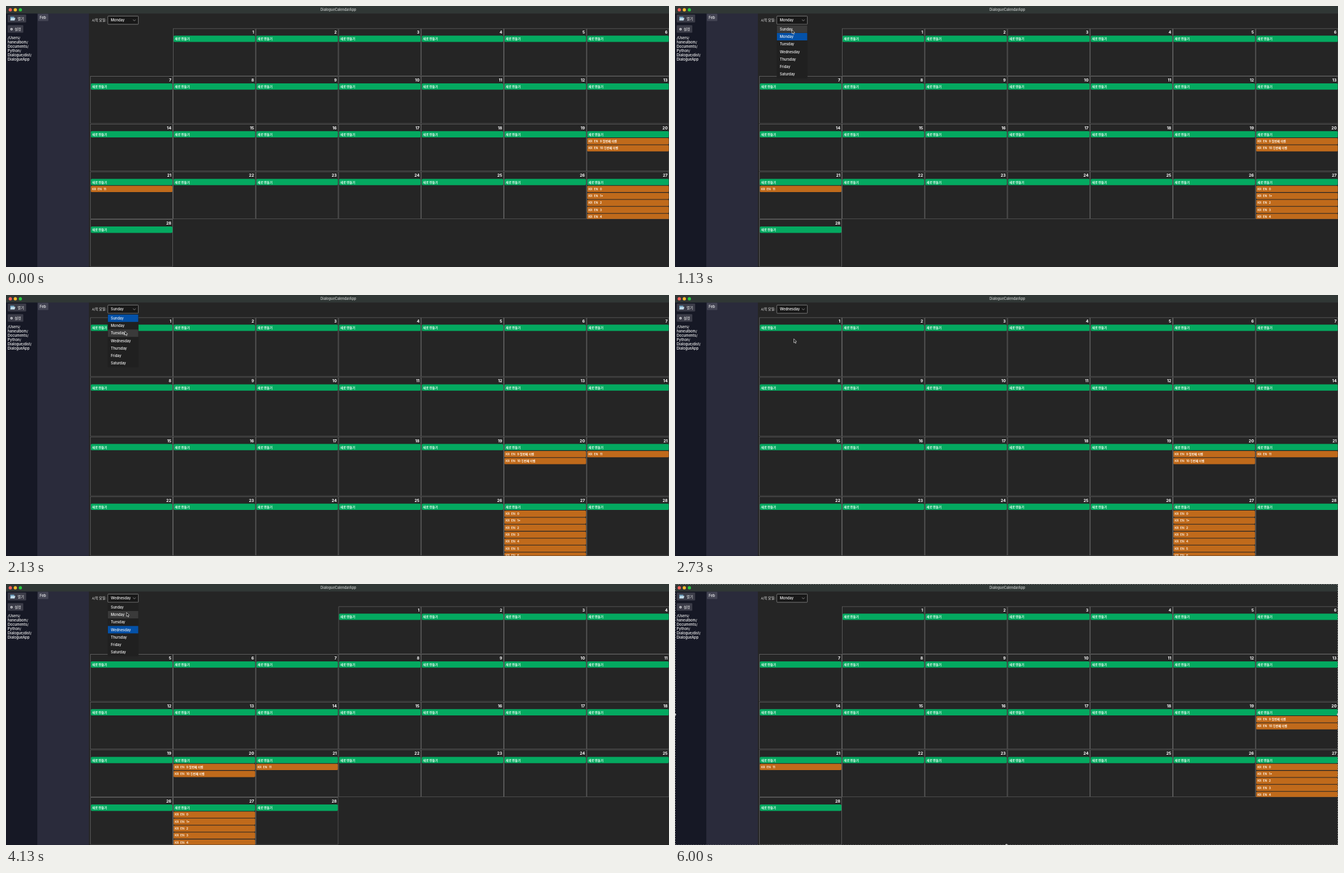
These frames come from a looping animation (1080x425 px, 6.54 s). An HTML page with a canvas:

```html
<!DOCTYPE html>
<html lang="ko">
<head>
<meta charset="utf-8">
<title>DialogueCalendarApp</title>
<style>
html, body { margin: 0; width: 100%; height: 100%; overflow: hidden; background: #252525; }
canvas { display: block; width: 1080px; height: 425px; }
</style>
</head>
<body>
<canvas id="stage"></canvas>
<script>
const W = 1080, H = 425, LOOP = 6540;
const canvas = document.getElementById('stage');
const ctx = canvas.getContext('2d');
const dpr = window.devicePixelRatio || 1;
canvas.width = W * dpr;
canvas.height = H * dpr;

const FONT = 'Inter, "Noto Sans CJK KR", "Noto Sans CJK", sans-serif';
const DAYS = ['Sunday', 'Monday', 'Tuesday', 'Wednesday', 'Thursday', 'Friday', 'Saturday'];
const PATH = ['/Users/', 'haneulbom/', 'Documents/', 'Python/', 'Dialogue/dist/', 'DialogueApp'];
const EVENTS = {
  20: ['9 첫번째 이벤', '10 두번째 이벤'],
  21: ['11'],
  27: ['0', '1*', '2', '3', '4', '5', '6']
};
const LEFT = 137.6, TOP = 36.8, BOTTOM = 425.3, COL = 134.75, CELL = 134;
const COMBO = { x: 165.8, y: 16.4, w: 49.8, h: 13.4 };
const ITEM_TOP = 31.8, ITEM_H = 12.2;

// Each visit opens the list, then picks the row under (x, y).
const VISITS = [
  { open: 930, pick: 1390, x: 190.6, y: 38.8 },
  { open: 2000, pick: 2710, x: 193.6, y: 71.3 },
  { open: 3530, pick: 4200, x: 196.3, y: 46.3 }
];
const START_DAY = 1, GRID_LAG = 75, LEAVE = 5470, STOP = 6000;
const OUTSIDE = { x: 540, y: 432 };

const rowAt = y => Math.floor((y - ITEM_TOP) / ITEM_H);

function dayAt(t) {
  return VISITS.reduce((day, v) => t >= v.pick ? rowAt(v.y) : day, START_DAY);
}

function pointerAt(t) {
  let { x, y } = OUTSIDE;
  const glide = (to, at, span) => {
    const k = Math.min(1, Math.max(0, (t - at) / span));
    const e = k * k * (3 - 2 * k);
    x += (to.x - x) * e;
    y += (to.y - y) * e;
  };
  for (const v of VISITS) {
    glide({ x: v.x, y: 26.3 }, v.open - 500, 300);
    glide(v, v.open, 200);
  }
  glide(OUTSIDE, LEAVE, 460);
  return { x, y };
}

function rect(x, y, w, h, fill) {
  ctx.fillStyle = fill;
  ctx.fillRect(x, y, w, h);
}

function round(x, y, w, h, r, fill, stroke) {
  ctx.beginPath();
  ctx.roundRect(x, y, w, h, r);
  ctx.fillStyle = fill;
  ctx.fill();
  if (stroke) {
    ctx.strokeStyle = stroke;
    ctx.lineWidth = 0.8;
    ctx.stroke();
  }
}

function dot(x, y, r, fill) {
  ctx.beginPath();
  ctx.arc(x, y, r, 0, Math.PI * 2);
  ctx.fillStyle = fill;
  ctx.fill();
}

function poly(points, fill, stroke) {
  ctx.beginPath();
  points.forEach(([x, y]) => ctx.lineTo(x, y));
  if (fill) {
    ctx.closePath();
    ctx.fillStyle = fill;
    ctx.fill();
  }
  if (stroke) {
    ctx.strokeStyle = stroke;
    ctx.lineWidth = 0.7;
    ctx.stroke();
  }
}

// y is the middle of the capitals
function text(str, x, y, size = 5.8, weight = 500, fill = '#f4f4f4', align = 'left') {
  ctx.font = `${weight} ${size}px ${FONT}`;
  ctx.textAlign = align;
  ctx.fillStyle = fill;
  ctx.fillText(str, x, y + size * 0.364);
}

function drawWindow() {
  rect(0, 0, W, H, '#252525');
  rect(0, 12, 51, H, '#161825');
  rect(51, 12, 84, H, '#2a2b3b');
  rect(0, 0, W, 12.3, '#303735');
  ['#fe5f57', '#febc2e', '#28c840'].forEach((c, i) => dot(7 + i * 8.2, 6.2, 2.6, c));
  text('DialogueCalendarApp', 541.3, 6.2, 5.5, 600, '#b9bebc', 'center');

  round(2.8, 14, 30, 12.8, 1.2, '#3b3c48');
  rect(7, 17.4, 6.5, 5.8, '#6d9fbd');
  poly([[8.3, 19.6], [15.3, 19.6], [14, 23.4], [7, 23.4]], '#c3dce9');
  text('열기', 18.8, 20.4);
  round(2.8, 31.3, 25.4, 12.2, 1.2, '#3b3c48');
  dot(9, 37.7, 2, '#d8d8dc');
  dot(9, 37.7, 0.8, '#4a4b57');
  text('설정', 14, 37.4);
  PATH.forEach((line, i) => text(line, 2.8, 51.5 + i * 7.08));
  round(52, 12.7, 17, 11.9, 1, '#434453');
  text('Feb', 55, 18.6);
  text('시작 요일:', 139.8, 23.2, 5.6);
}

function drawBar(x, y, fill) {
  round(x + 0.6, y, CELL - 1.1, 10.3, 1.6, fill);
}

function drawCell(day, x, y, h) {
  ctx.save();
  ctx.beginPath();
  ctx.rect(x - 0.5, y - 0.5, CELL + 1, h + 0.6);
  ctx.clip();
  ctx.strokeStyle = '#636363';
  ctx.lineWidth = 0.9;
  ctx.strokeRect(x, y, CELL, h);
  text(day, x + 131.7, y + 6.1, 6.5, 700, '#fff', 'right');
  drawBar(x, y + 11.5, '#04a960');
  text('새로 만들기', x + 2.7, y + 16.8, 5, 700, '#eafff4');
  (EVENTS[day] || []).forEach((label, i) => {
    const mid = y + 28.1 + i * 11.35;
    drawBar(x, mid - 5.2, '#c06a1b');
    text('KR', x + 2.6, mid, 4.8, 600, '#fff1e2');
    text('EN', x + 11.7, mid, 4.8, 600, '#fff1e2');
    text(label, x + 21.4, mid, 4.8, 700, '#fff1e2');
  });
  ctx.restore();
}

function drawGrid(lead) {
  const rows = Math.ceil((lead + 28) / 7);
  const pitch = (BOTTOM - TOP) / rows;
  for (let day = 1; day <= 28; day++) {
    const n = day - 1 + lead;
    drawCell(day, LEFT + (n % 7) * COL, TOP + Math.floor(n / 7) * pitch, pitch - 1);
  }
}

function drawCombo(day, hot) {
  const { x, y, w, h } = COMBO;
  round(x, y, w, h, 1, hot ? '#0e0e0e' : '#181818', hot ? '#d0d0d0' : '#888');
  ctx.save();
  ctx.beginPath();
  ctx.rect(x, y, 37, h);
  ctx.clip();
  text(DAYS[day], 170.7, 23.1);
  ctx.restore();
  poly([[206.8, 22], [209.1, 24.3], [211.4, 22]], null, '#a8a8a8');
}

function drawList(day, over) {
  round(165.6, 30.6, 50.2, 87.4, 1, '#202020');
  DAYS.forEach((name, i) => {
    const top = ITEM_TOP + i * ITEM_H;
    const fill = i === day ? '#0451a8' : i === over ? '#3a3a3a' : null;
    if (fill) rect(166, top, 49.4, ITEM_H - 0.2, fill);
    text(name, 170.7, top + 6.1);
  });
}

function drawPointer({ x, y }) {
  const shape = [[0, 0], [0, 6.4], [1.5, 5.1], [2.6, 7.5], [3.6, 7], [2.6, 4.7], [4.5, 4.6]];
  poly(shape.map(([a, b]) => [x + a, y + b]), '#111', '#e4e4e4');
}

function drawSelection() {
  ctx.strokeStyle = '#a4a4a4';
  ctx.lineWidth = 0.8;
  ctx.setLineDash([2, 2]);
  ctx.strokeRect(0.4, 0.4, W - 0.8, H - 0.4);
  ctx.setLineDash([]);
  [[0, H / 2], [W, H / 2], [W / 2, H]].forEach(([x, y]) => dot(x, y, 1.8, '#d0d0d0'));
}

function draw(t) {
  ctx.setTransform(dpr, 0, 0, dpr, 0, 0);
  const p = pointerAt(t);
  const day = dayAt(t);
  const hot = Math.abs(p.x - COMBO.x - COMBO.w / 2) < COMBO.w / 2 && Math.abs(p.y - COMBO.y - COMBO.h / 2) < COMBO.h / 2;
  drawWindow();
  drawGrid(dayAt(t - GRID_LAG));
  drawCombo(day, hot);
  if (VISITS.some(v => t >= v.open && t < v.pick)) drawList(day, rowAt(p.y));
  drawPointer(p);
  if (t >= STOP) drawSelection();
}

const start = performance.now();
function tick() {
  draw((performance.now() - start) % LOOP);
  requestAnimationFrame(tick);
}
tick();
</script>
</body>
</html>
```
